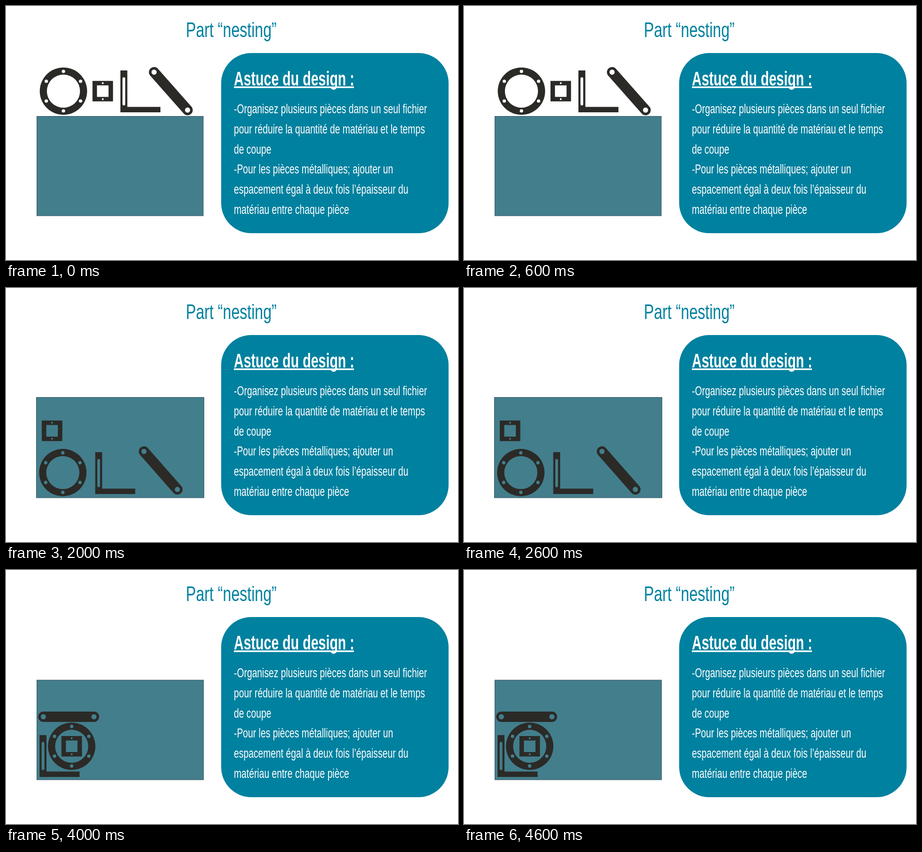
An HTML page that plays this animation: 960x540 px, repeating every 5 s.

```html
<!DOCTYPE html>
<html lang="fr">
<head>
<meta charset="utf-8">
<title>Part “nesting”</title>
<style>
  html, body { margin: 0; width: 100%; height: 100%; overflow: hidden; background: #fff; }
  svg { display: block; width: 960px; height: 540px; }
  text { font-family: "Liberation Sans", Arial, sans-serif; fill: #fff; }
  .title { font-size: 44px; fill: #00819f; }
  .heading { font-size: 42px; font-weight: 700; }
  .body { font-size: 28px; }
  .panel { fill: #00819f; }
  .sheet { fill: #437e8c; stroke: #34555e; }
  .part { fill: #2b2a27; fill-rule: evenodd; }

  /* Each step holds for one second of the five-second loop. */
  .step { opacity: 0; animation: show 5s step-end calc((var(--n) - 5) * 1s) infinite; }
  @keyframes show {
    0% { opacity: 1; }
    20%, 100% { opacity: 0; }
  }
</style>
</head>
<body>
<svg viewBox="0 0 960 540">
  <defs>
    <path id="ring" class="part" d="
      M-50.3 0a50.3 50.3 0 1 0 100.6 0a50.3 50.3 0 1 0-100.6 0
      M-35.2 0a35.2 35.2 0 1 0 70.4 0a35.2 35.2 0 1 0-70.4 0
      M-3.6-42a3.6 3.6 0 1 0 7.2 0a3.6 3.6 0 1 0-7.2 0
      M-3.6 42a3.6 3.6 0 1 0 7.2 0a3.6 3.6 0 1 0-7.2 0
      M32.8-21a3.6 3.6 0 1 0 7.2 0a3.6 3.6 0 1 0-7.2 0
      M32.8 21a3.6 3.6 0 1 0 7.2 0a3.6 3.6 0 1 0-7.2 0
      M-40-21a3.6 3.6 0 1 0 7.2 0a3.6 3.6 0 1 0-7.2 0
      M-40 21a3.6 3.6 0 1 0 7.2 0a3.6 3.6 0 1 0-7.2 0"/>
    <path id="square" class="part" d="
      M-21.8-21.8h43.6v43.6h-43.6z
      M-12.3-12.3h24.6v24.6h-24.6z
      M-2-17a2 2 0 1 0 4 0a2 2 0 1 0-4 0
      M-2 17a2 2 0 1 0 4 0a2 2 0 1 0-4 0"/>
    <path id="bracket" class="part" d="
      M0 0v-89h14.7v77.5h70.3v11.5z
      M4.4-71.5a2.9 2.9 0 0 1 5.8 0v54a2.9 2.9 0 0 1-5.8 0z"/>
    <path id="link" class="part" d="
      M0-11h107.5a11 11 0 0 1 0 22h-107.5a11 11 0 0 1 0-22z
      M-5.5 0a5.5 5.5 0 1 0 11 0a5.5 5.5 0 1 0-11 0
      M102 0a5.5 5.5 0 1 0 11 0a5.5 5.5 0 1 0-11 0"/>
  </defs>

  <text class="title" transform="translate(382 66) scale(.73 1)">Part “nesting”</text>

  <rect class="panel" x="457" y="100" width="483" height="383" rx="64"/>
  <rect x="484" y="171" width="255" height="3.4" fill="#fff"/>
  <text class="heading" transform="translate(484 169) scale(.681 1)">Astuce du design :</text>
  <text class="body" transform="translate(484 228) scale(.69 1)">
    <tspan x="0">-Organisez plusieurs pièces dans un seul fichier</tspan>
    <tspan x="0" dy="42.8">pour réduire la quantité de matériau et le temps</tspan>
    <tspan x="0" dy="42.8">de coupe</tspan>
    <tspan x="0" dy="42.8">-Pour les pièces métalliques; ajouter un</tspan>
    <tspan x="0" dy="42.8">espacement égal à deux fois l’épaisseur du</tspan>
    <tspan x="0" dy="42.8">matériau entre chaque pièce</tspan>
  </text>

  <g class="step" style="--n:0">
    <rect class="sheet" x="65.5" y="234.5" width="353.5" height="211.5"/>
    <use href="#ring" x="122" y="181"/>
    <use href="#square" x="205.5" y="181"/>
    <use href="#bracket" x="243" y="226"/>
    <use href="#link" transform="translate(314.5 140.7) rotate(48.6)"/>
  </g>
  <g class="step" style="--n:1">
    <rect class="sheet" x="65.5" y="233.5" width="354" height="212.5"/>
    <use href="#ring" x="121.5" y="392.5"/>
    <use href="#square" x="98.6" y="304"/>
    <use href="#bracket" x="243" y="225"/>
    <use href="#link" transform="translate(314.5 139.5) rotate(48.6)"/>
  </g>
  <g class="step" style="--n:2">
    <rect class="sheet" x="64.5" y="232.5" width="356" height="213.5"/>
    <use href="#ring" x="120.7" y="392.4"/>
    <use href="#square" x="97.8" y="303.6"/>
    <use href="#bracket" x="189.5" y="438"/>
    <use href="#link" transform="translate(293 347.5) rotate(48.7)"/>
  </g>
  <g class="step" style="--n:3">
    <rect class="sheet" x="68.5" y="234.5" width="351.5" height="210"/>
    <use href="#ring" x="124.6" y="391.8"/>
    <use href="#square" x="123.8" y="391.5"/>
    <use href="#bracket" x="191.5" y="437"/>
    <use href="#link" x="84" y="325.7"/>
  </g>
  <g class="step" style="--n:4">
    <rect class="sheet" x="65.5" y="234" width="354" height="212"/>
    <use href="#ring" x="139.5" y="374.7"/>
    <use href="#square" x="139.5" y="374.8"/>
    <use href="#bracket" x="71.3" y="440"/>
    <use href="#link" x="79.3" y="312"/>
  </g>
</svg>
</body>
</html>
```
